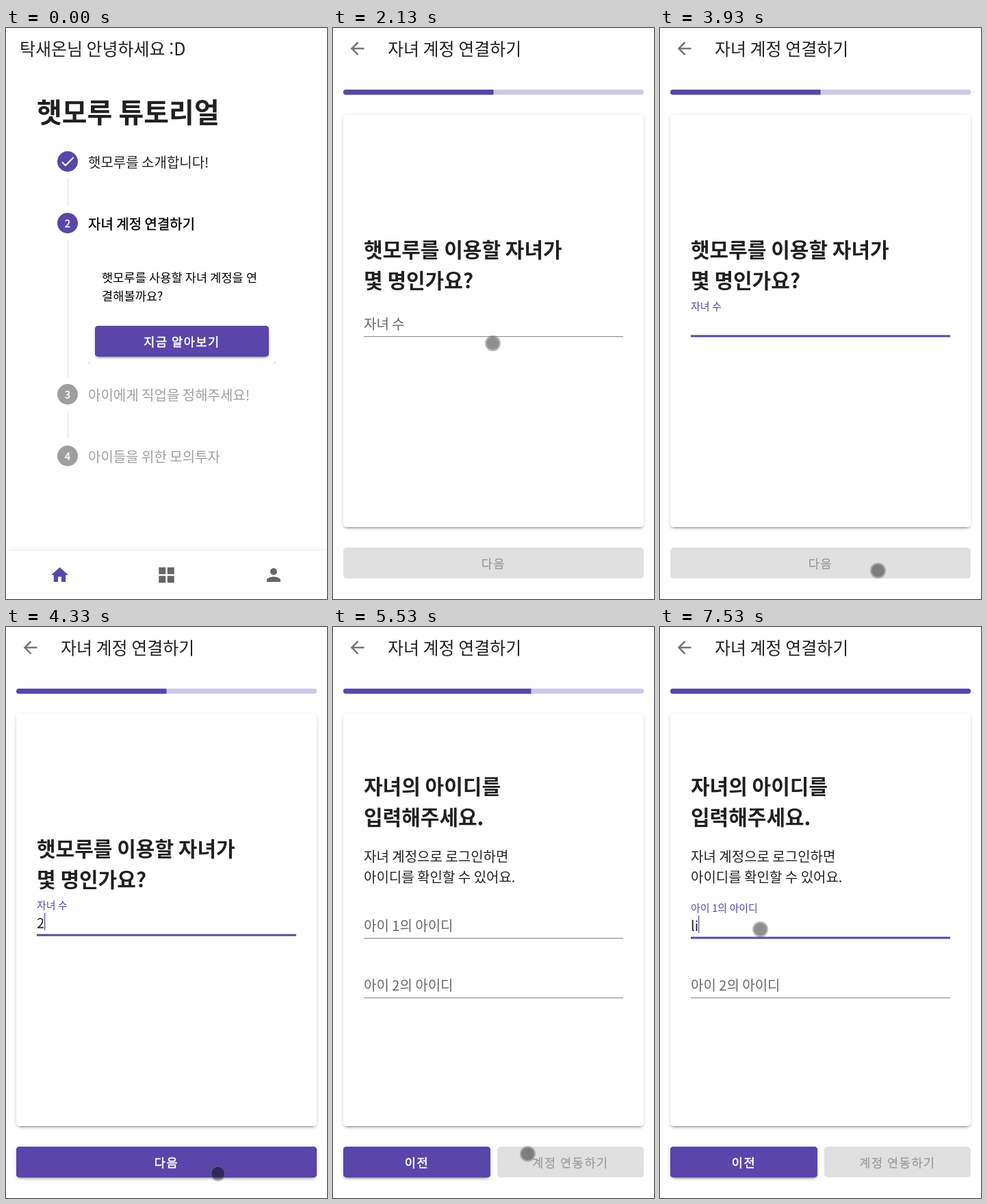
Recreate the animation shown at these times as an HTML page with a canvas. Size 469 by 834 pixels, loop 8 s.

```html
<!DOCTYPE html>
<html lang="ko">
<head>
<meta charset="utf-8">
<title>자녀 계정 연결하기</title>
<style>
  html, body { margin: 0; width: 100%; height: 100%; overflow: hidden; background: #fff; }
  canvas { display: block; width: 469px; height: 834px; }
</style>
</head>
<body>
<canvas id="stage"></canvas>
<script>
const W = 469, H = 834, LOOP = 8000, FPS = 15;
const PRIMARY = '#5846aa', INK = 'rgba(0,0,0,.87)', MUTED = 'rgba(0,0,0,.6)', FAINT = 'rgba(0,0,0,.38)';
const FONT = '"Noto Sans CJK KR", "Noto Sans KR", "Noto Sans CJK", sans-serif';

const ICONS = {
  check: 'M21,7L9,19L3.5,13.5L4.91,12.09L9,16.17L19.59,5.59L21,7Z',
  back: 'M20,11V13H8L13.5,18.5L12.08,19.92L4.16,12L12.08,4.08L13.5,5.5L8,11H20Z',
  home: 'M10,20V14H14V20H19V12H22L12,3L2,12H5V20H10Z',
  grid: 'M3,11H11V3H3ZM3,21H11V13H3ZM13,21H21V13H13ZM13,3V11H21V3Z',
  person: 'M12,4A4,4 0 0,1 12,12A4,4 0 0,1 12,4M12,14C16.42,14 20,15.79 20,18V20H4V18C4,15.79 7.58,14 12,14Z'
};

// Event times in ms
const TAP_START = 1930, OPEN_COUNT = 2060, FOCUS_COUNT = 3070, TYPE_COUNT = 4130;
const TAP_NEXT = 5260, OPEN_IDS = 5465, FOCUS_ID = 6135, TYPE_ID1 = 7400, TYPE_ID2 = 7530;

const canvas = document.getElementById('stage');
const ctx = canvas.getContext('2d');
const dpr = window.devicePixelRatio || 1;
canvas.width = W * dpr;
canvas.height = H * dpr;

const clamp = v => Math.min(1, Math.max(0, v));
const lerp = (a, b, k) => a + (b - a) * k;

function bezier(x1, y1, x2, y2) {
  const at = (a, b, s) => 3 * (1 - s) * (1 - s) * s * a + 3 * (1 - s) * s * s * b + s * s * s;
  return x => {
    if (x <= 0 || x >= 1) return clamp(x);
    let lo = 0, hi = 1;
    for (let i = 0; i < 24; i++) {
      const mid = (lo + hi) / 2;
      if (at(x1, x2, mid) < x) lo = mid; else hi = mid;
    }
    return at(y1, y2, lo);
  };
}
const swing = bezier(.25, .8, .5, 1);
const standard = bezier(.4, 0, .2, 1);
const smooth = bezier(.4, 0, .6, 1);

function text(str, x, y, size, color = INK, opt = {}) {
  ctx.font = `${opt.weight || 400} ${size}px ${FONT}`;
  ctx.letterSpacing = (opt.spacing || 0) + 'px';
  ctx.textAlign = 'left';
  ctx.fillStyle = ctx.strokeStyle = color;
  if (opt.center) x -= ctx.measureText(str).width / 2;
  ctx.fillText(str, x, y);
  if (opt.stroke) {
    ctx.lineWidth = opt.stroke;
    ctx.lineJoin = 'round';
    ctx.strokeText(str, x, y);
  }
}

function rect(x, y, w, h, color) {
  ctx.fillStyle = color;
  ctx.fillRect(x, y, w, h);
}

function round(x, y, w, h, r) {
  ctx.beginPath();
  ctx.roundRect(x, y, w, h, r);
}

function disc(x, y, r, color) {
  ctx.fillStyle = color;
  ctx.beginPath();
  ctx.arc(x, y, r, 0, Math.PI * 2);
  ctx.fill();
}

function icon(name, x, y, size, color) {
  ctx.save();
  ctx.translate(x - size / 2, y - size / 2);
  ctx.scale(size / 24, size / 24);
  ctx.fillStyle = color;
  ctx.fill(new Path2D(ICONS[name]));
  ctx.restore();
}

// Each layer: offset y, blur, spread, alpha
const RAISED = [[3.75, 1.25, -2.5, .2], [2.5, 2.5, 0, .14], [1.25, 6.25, 0, .12]];
const BAR = [[2.5, 5, -1.25, .2], [5, 6.25, 0, .14], [1.25, 12.5, 0, .12]];

function surface(x, y, w, h, r, color, layers, strength = 1) {
  ctx.fillStyle = color;
  for (const [dy, blur, spread, alpha] of layers) {
    ctx.save();
    ctx.shadowColor = `rgba(0,0,0,${alpha * strength})`;
    ctx.shadowOffsetY = dy * dpr;
    ctx.shadowBlur = blur * dpr;
    round(x - spread, y - spread, w + 2 * spread, h + 2 * spread, r);
    ctx.fill();
    ctx.restore();
  }
  round(x, y, w, h, r);
  ctx.fill();
}

function button(label, x, y, w, enabled, strength = 1) {
  if (enabled) {
    surface(x, y, w, 45, 5, PRIMARY, RAISED, strength);
  } else {
    ctx.fillStyle = '#e0e0e0';
    round(x, y, w, 45, 5);
    ctx.fill();
  }
  text(label, x + w / 2, y + 30, 17.5, enabled ? '#fff' : 'rgba(0,0,0,.26)',
    { center: true, spacing: 1.5625, stroke: enabled ? .6 : .3 });
}

function ripple(x, y, w, cx, cy, age) {
  if (age < 0) return;
  ctx.save();
  round(x, y, w, 45, 5);
  ctx.clip();
  disc(cx, cy, lerp(20, w * .7, standard(clamp(age / 300))), `rgba(255,255,255,${.22 * clamp(age / 100)})`);
  ctx.restore();
}

function step(n, y, label, state) {
  const on = state !== 'todo';
  disc(90, y, 15, on ? PRIMARY : '#9e9e9e');
  if (state === 'done') icon('check', 90, y, 25, '#fff');
  else text(String(n), 90, y + 5.5, 15, '#fff', { center: true, stroke: .4 });
  if (state === 'now') text(label, 120, y + 8.5, 20, '#000', { stroke: .4 });
  else text(label, 120, y + 8.5, 20, on ? INK : FAINT);
}

function homePage(t) {
  text('탁새온님 안녕하세요 :D', 20, 40, 25);
  text('햇모루 튜토리얼', 45, 138, 40, INK, { weight: 700 });
  for (const [y, h] of [[220, 40], [310, 200], [560, 40]]) rect(90, y, 1, h, '#dcdcdc');
  step(1, 195, '햇모루를 소개합니다!', 'done');
  step(2, 285, '자녀 계정 연결하기', 'now');
  step(3, 535, '아이에게 직업을 정해주세요!', 'todo');
  step(4, 625, '아이들을 위한 모의투자', 'todo');

  ctx.save();
  ctx.beginPath();
  ctx.rect(120, 330, 274, 160);
  ctx.clip();
  surface(120, 330, 273.75, 160, 5, '#fff', RAISED);
  ctx.restore();
  text('햇모루를 사용할 자녀 계정을 연', 140, 370.5, 17.5, '#000', { spacing: .125 });
  text('결해볼까요?', 140, 398, 17.5, '#000', { spacing: .125 });
  button('지금 알아보기', 130, 435, 254, true);
  ripple(130, 435, 254, 233.5, 460.5, t - TAP_START);

  surface(0, 764, W, 70, 0, '#fff', BAR);
  icon('home', 78.5, 799, 30, PRIMARY);
  icon('grid', 234.5, 799, 30, '#666');
  icon('person', 391, 799, 30, '#666');
}

function frame(progress) {
  icon('back', 35.5, 30, 30, '#757575');
  text('자녀 계정 연결하기', 80, 40, 25);
  ctx.save();
  round(15, 90, 439, 7.5, 4);
  ctx.clip();
  rect(15, 90, 439, 8, '#cdc8e6');
  rect(15, 90, 439 * progress, 8, PRIMARY);
  ctx.restore();
  surface(15, 127, 439, 602, 5, '#fff', RAISED);
}

// Text field whose label starts at baseline y; age counts from focus
function field(label, y, age, value, caretAge) {
  const k = swing(clamp(age / 300));
  const top = y - 21.2, scale = lerp(1, .75, k);
  const mix = clamp(age / 400);
  const active = `rgb(${lerp(33, 88, mix)},${lerp(33, 70, mix)},${lerp(33, 170, mix)})`;
  rect(45, y + 10.5, 379, 1.25, `rgba(0,0,0,${lerp(.42, .87, k)})`);
  if (k > 0) {
    const w = 379 * k;
    rect(234.5 - w / 2, y + 9, w, 2.75, active);
  }
  ctx.save();
  ctx.translate(45, top - 22.5 * k);
  ctx.scale(scale, scale);
  text(label, 0, 21.2, 20, age < 0 ? MUTED : PRIMARY);
  ctx.restore();
  if (age < 0) return;
  text(value, 45, y, 20);
  if (Math.floor(caretAge / 500) % 2 === 0) {
    const x = 45 + (value ? ctx.measureText(value).width - .5 : 0);
    rect(Math.round(x), y - 22, 1.25, 25.5, PRIMARY);
  }
}

function countPage(t) {
  frame(.5);
  text('햇모루를 이용할 자녀가', 45, 335, 30, INK, { weight: 700 });
  text('몇 명인가요?', 45, 380, 30, INK, { weight: 700 });
  const typed = t >= TYPE_COUNT;
  field('자녀 수', 439.5, t - FOCUS_COUNT, typed ? '2' : '', t - (typed ? TYPE_COUNT : FOCUS_COUNT));
  button('다음', 15, 759, 439, typed, standard(clamp((t - TYPE_COUNT) / 280)));
  ripple(15, 759, 439, 284.5, 783.5, t - TAP_NEXT);
}

function idPage(t) {
  frame(lerp(.5, 1, smooth(clamp((t - OPEN_IDS) / 200))));
  text('자녀의 아이디를', 45, 244, 30, INK, { weight: 700 });
  text('입력해주세요.', 45, 289, 30, INK, { weight: 700 });
  text('자녀 계정으로 로그인하면', 45, 343, 20);
  text('아이디를 확인할 수 있어요.', 45, 373, 20);
  const value = t >= TYPE_ID2 ? 'li' : t >= TYPE_ID1 ? 'l' : '';
  const since = t >= TYPE_ID2 ? TYPE_ID2 : t >= TYPE_ID1 ? TYPE_ID1 : FOCUS_ID - 5;
  field('아이 1의 아이디', 443.5, t - FOCUS_ID + 5, value, t - since);
  field('아이 2의 아이디', 530.5, -1, '', 0);
  button('이전', 15, 759, 215, true);
  button('계정 연동하기', 240, 759, 214, false);
}

// Pointer visits: each is a list of [time, x, y], the last time ends the visit
const VISITS = [
  [[530, 471.5, 487.5], [597, 471.5, 487.5]],
  [[1265, 233.5, 460.5], [2398, 233.5, 460.5]],
  [[2798, 183.5, 437.5], [3390, 183.5, 437.5], [3733, 288, 711.5], [3797, 288, 711.5]],
  [[3930, 318.5, 792.5], [4200, 318.5, 792.5], [4467, 301, 803.5], [4733, 284.5, 783.5],
   [5467, 284.5, 783.5], [5533, 284.5, 769.5], [5933, 146.5, 441.5], [LOOP, 146.5, 441.5]]
];

function pointer(t) {
  const path = VISITS.find(v => t >= v[0][0] && t < v[v.length - 1][0]);
  if (!path) return;
  const i = path.findIndex(p => p[0] > t);
  const [t0, x0, y0] = path[i - 1], [t1, x1, y1] = path[i];
  const k = smooth((t - t0) / (t1 - t0));
  const x = lerp(x0, x1, k), y = lerp(y0, y1, k);
  disc(x, y, 9.5, 'rgba(0,0,0,.44)');
  ctx.strokeStyle = 'rgba(100,100,100,.45)';
  ctx.lineWidth = 2;
  ctx.beginPath();
  ctx.arc(x, y, 10.5, 0, Math.PI * 2);
  ctx.stroke();
}

function draw(ms) {
  const t = Math.floor((ms + 4) * FPS / 1000) * 1000 / FPS % LOOP;
  ctx.setTransform(dpr, 0, 0, dpr, 0, 0);
  rect(0, 0, W, H, '#fff');
  if (t < OPEN_COUNT) homePage(t);
  else if (t < OPEN_IDS) countPage(t);
  else idPage(t);
  pointer(t);
}

let start;
function tick(now) {
  if (start === undefined) start = now;
  draw((now - start) % LOOP);
  requestAnimationFrame(tick);
}
draw(0);
requestAnimationFrame(tick);
</script>
</body>
</html>
```
